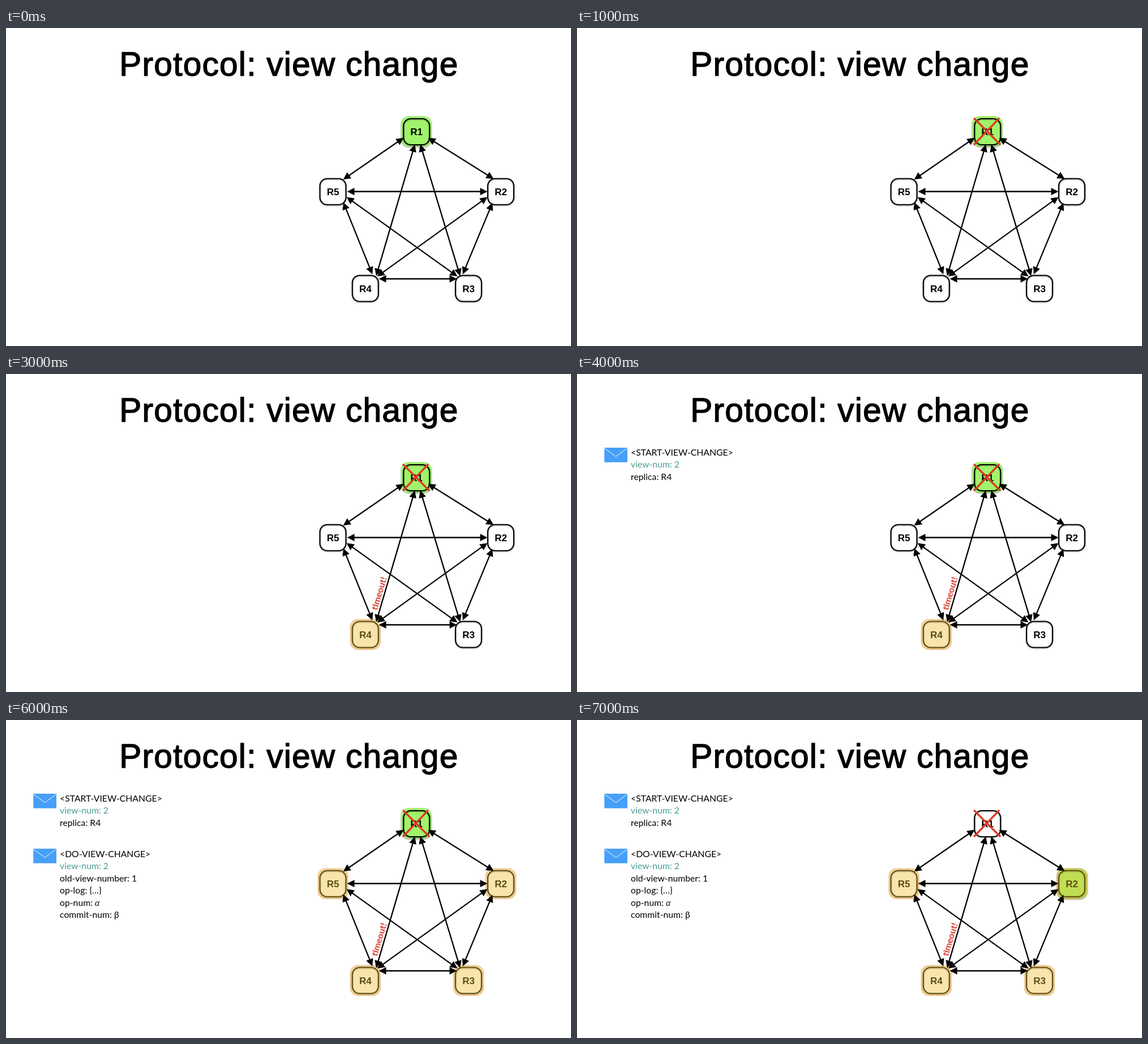
An HTML page that plays this animation: 998 by 561 pixels, repeating every 8 s.

```html
<!DOCTYPE html>
<html lang="en">
<head>
<meta charset="utf-8">
<title>View change</title>
<style>
  html, body { margin: 0; width: 100%; height: 100%; overflow: hidden; background: #fff; }
  svg { display: block; width: 100vw; height: 100vh; }
  .title { font: 58.5px "Liberation Sans", Arial, sans-serif; letter-spacing: 1.28px; stroke: #000; stroke-width: 1.4; }
  .label { font: bold 17px "Liberation Sans", Arial, sans-serif; text-anchor: middle; }
  .message { font: 15.75px Lato, sans-serif; }
  .message .view { fill: #459c91; }
  .alpha { font-family: "Liberation Serif", serif; font-style: italic; }
  .timeout { font: bold 15.8px Lato, sans-serif; fill: #d93225; }
  .box { fill: none; stroke: #000; stroke-width: 2.1; filter: url(#rough) drop-shadow(0 1.5px 1px rgba(0, 0, 0, .4)); }
  .leader { fill: #a1f36b; filter: drop-shadow(0 1px 1px rgba(0, 0, 0, .4)); }
  .changing { fill: #edbe32; fill-opacity: .4; stroke: #e0963c; stroke-opacity: .4; stroke-width: 3; }
  .links { stroke: #000; stroke-width: 2.3; filter: url(#rough); }
  .cross { fill: none; stroke: #dc3a26; stroke-width: 3.3; filter: url(#rough); }
</style>
</head>
<body>
<svg id="stage" viewBox="0 0 998 561">
  <filter id="rough" filterUnits="userSpaceOnUse" x="0" y="0" width="998" height="561" color-interpolation-filters="sRGB">
    <feTurbulence type="fractalNoise" baseFrequency=".3" numOctaves="2" seed="4"/>
    <feDisplacementMap in="SourceGraphic" scale="1.4" xChannelSelector="R" yChannelSelector="G"/>
  </filter>
</svg>
<script>
const DURATION = 8000;
const stage = document.getElementById("stage");

const nodes = [
  { name: "R1", x: 725.2, y: 183 },
  { name: "R2", x: 874, y: 288.7, changing: 5000 },
  { name: "R3", x: 817, y: 459.5, changing: 5000 },
  { name: "R4", x: 634.8, y: 459.5, changing: 3000 },
  { name: "R5", x: 577.5, y: 288.7, changing: 5000 }
];

const links = [
  [702, 194, 596, 267], [746, 194, 861, 266], [603, 288.5, 850, 288.5],
  [722, 206, 654, 437], [732, 206, 802, 437], [596, 308, 647, 434],
  [859, 309, 807, 434], [602, 298.5, 797, 438], [850, 298.5, 656, 438],
  [659, 442.5, 796, 442.5]
];

const during = (from, to, content) => `<g data-from="${from}" data-to="${to}">${content}</g>`;

const square = (type, { x, y }, size, radius) =>
  `<rect class="${type}" x="${x - size / 2}" y="${y - size / 2}" width="${size}" height="${size}" rx="${radius}"/>`;

function drawNode(node) {
  const highlight = node.changing ? during(node.changing, DURATION, square("changing", node, 52, 13)) : "";
  return square("box", node, 46, 13) +
    `<text class="label" x="${node.x}" y="${node.y + 6.1}">${node.name}</text>` + highlight;
}

function drawLink([x1, y1, x2, y2]) {
  const angle = Math.atan2(y2 - y1, x2 - x1) * 180 / Math.PI;
  const length = Math.hypot(x2 - x1, y2 - y1);
  return `<g transform="translate(${x1} ${y1}) rotate(${angle})">
    <path d="M8 0H${length - 8}"/>
    <path stroke="none" d="M-.5 0l13 -6.5v13zM${length + .5} 0l-13 -6.5v13z"/></g>`;
}

function drawMessage(envelopeY, baseline, lines) {
  const text = lines.map((line, i) =>
    `<text x="95" y="${baseline + i * 21.5}" class="${i === 1 ? "view" : ""}">${line}</text>`).join("");
  return `<g class="message"><rect x="48.3" y="${envelopeY}" width="40.7" height="25.7" fill="#469ff8"/>
    <path d="M49 ${envelopeY + 1}l19.7 14.7l19.7 -14.7" fill="none" stroke="#fff"/>${text}</g>`;
}

stage.innerHTML += [
  `<text class="title" x="200.3" y="83.8">Protocol: view change</text>`,
  during(0, 7000, square("leader", { x: 724.7, y: 182.5 }, 54, 14)),
  during(7000, DURATION, square("leader", { x: 875, y: 288.7 }, 54, 14)),
  ...nodes.map(drawNode),
  `<g class="links">${links.map(drawLink).join("")}</g>`,
  during(1000, DURATION, `<path class="cross" d="M701 159L748 206M746 159L701 206"/>`),
  during(2000, DURATION, `<text class="timeout" transform="translate(655.5 417.5) rotate(-73.4)">timeout!</text>`),
  during(4000, DURATION, drawMessage(130, 143.8,
    ["&lt;START-VIEW-CHANGE&gt;", "view-num: 2", "replica: R4"])),
  during(6000, DURATION, drawMessage(227, 241.8,
    ["&lt;DO-VIEW-CHANGE&gt;", "view-num: 2", "old-view-number: 1", "op-log: {…}",
      `op-num: <tspan class="alpha">α</tspan>`, "commit-num: β"]))
].join("");

const timed = [...stage.querySelectorAll("[data-from]")];

function render() {
  const time = performance.now() % DURATION;
  for (const part of timed) {
    const shown = time >= +part.dataset.from && time < +part.dataset.to;
    part.style.display = shown ? "" : "none";
  }
  requestAnimationFrame(render);
}
render();
</script>
</body>
</html>
```
